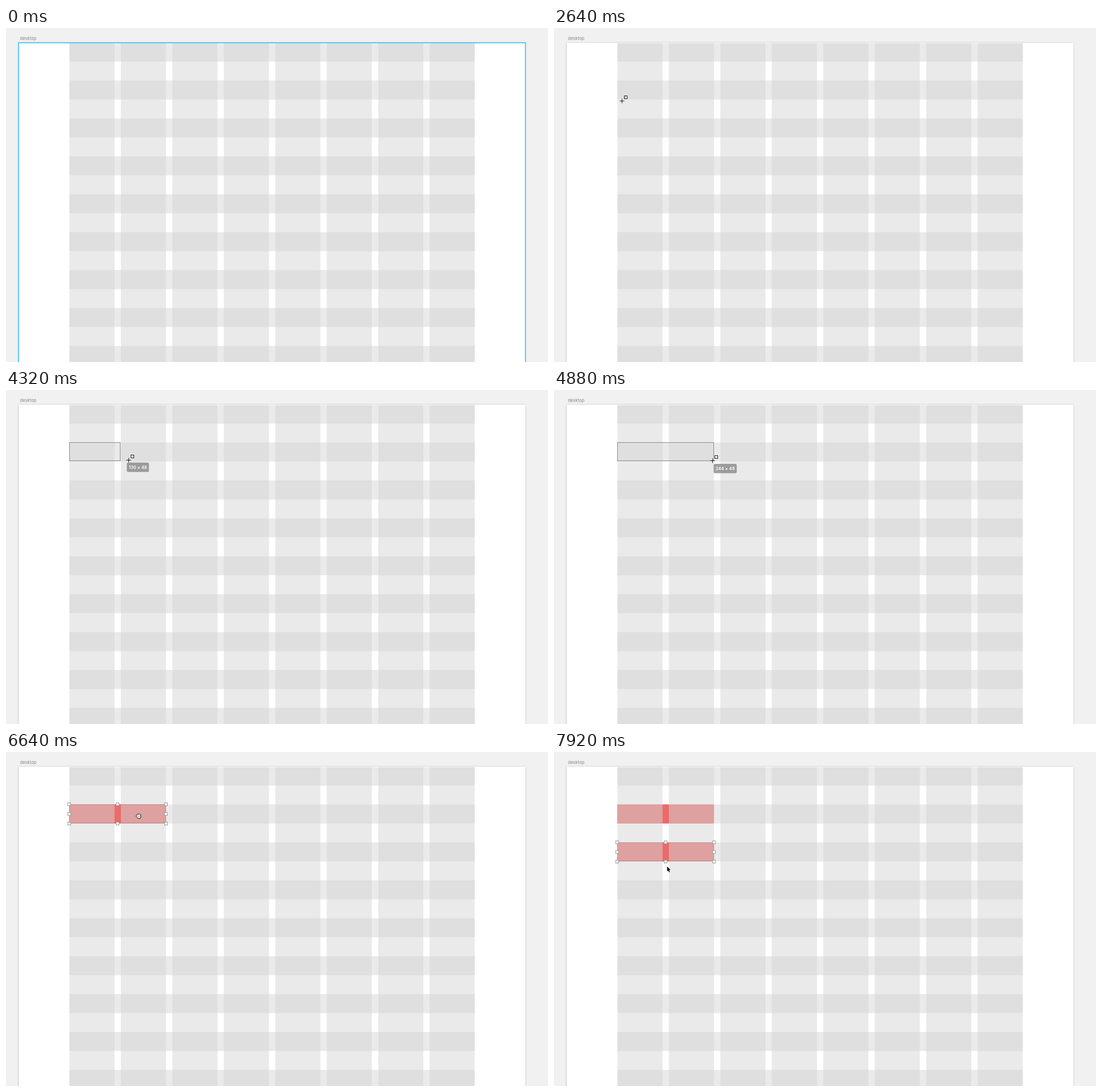
Write an HTML page with a canvas that moves like this. It is 952 px wide and 588 px high and loops after 8 s.

```html
<!DOCTYPE html>
<html lang="en">
<head>
<meta charset="utf-8">
<title>Grid layout</title>
<style>
html, body { margin: 0; width: 100%; height: 100%; overflow: hidden; background: #f1f1f1; }
canvas { display: block; }
</style>
</head>
<body>
<canvas id="stage" width="952" height="588"></canvas>
<script>
const ctx = document.getElementById('stage').getContext('2d');
const LOOP = 8000, STEP = 80;
const SCALE = 712 / 1024;
const ROW = 48 * SCALE, COL = 114 * SCALE, PITCH = 130 * SCALE;
const BOARD = { x: 22.3, y: 25.7, w: 890, h: 600 };
const LEFT = 111.4, WIDTH = 712;
const BLOCK = { x: LEFT, y: BOARD.y + 2 * ROW, w: PITCH + COL, h: ROW };
const FONT = 'Inter, Roboto, sans-serif';

// Moments at which the state changes
const ENTER = 640, SELECT = 1280, TOOL = 2000, DRAW = 3680, DROP = 5200;
const COPY = 6640, RELEASE = 7760;

// The pointer rests between moves; power 1 is linear, higher slows to a stop
const GRAB_Y = 113;
const MOVES = [
  { from: ENTER, to: 1120, x: 260, y: 261 },
  { from: SELECT, to: 1600, x: 225, y: 228 },
  { from: 1920, to: 2800, x: 115, y: 126 },
  { from: 2840, to: 3520, x: 112, y: 93 },
  { from: 3680, to: 3780, x: 130, y: 110, power: 1 },
  { from: 3780, to: 3840, x: 140, y: 114, power: 1 },
  { from: 3840, to: 4480, x: 233, y: 126, power: 1.2 },
  { from: 4520, to: 5040, x: 281, y: 125, power: 2.5 },
  { from: 5160, to: 5600, x: 296, y: 167 },
  { from: 5920, to: 6560, x: 233, y: GRAB_Y },
  { from: COPY, to: 7600, x: 233, y: 180 },
  { from: 7720, to: 7920, x: 199, y: 201 }
];

function pointerAt(t) {
  let x = 497, y = 574;
  for (const { from, to, x: tx, y: ty, power = 2 } of MOVES) {
    const p = Math.min(1, Math.max(0, (t - from) / (to - from)));
    const e = 1 - (1 - p) ** power;
    x += (tx - x) * e;
    y += (ty - y) * e;
  }
  return [x, y];
}

function snap(value, edges, reach) {
  const edge = edges.find(e => Math.abs(e - value) < reach);
  return edge === undefined ? value : edge;
}

function fill(color, x, y, w, h) {
  ctx.fillStyle = color;
  ctx.fillRect(x, y, w, h);
}

function stroke(color, x, y, w, h, width = 1) {
  ctx.strokeStyle = color;
  ctx.lineWidth = width;
  ctx.strokeRect(x, y, w, h);
}

function line(color, width, ...points) {
  ctx.strokeStyle = color;
  ctx.lineWidth = width;
  ctx.beginPath();
  points.forEach(([x, y]) => ctx.lineTo(x, y));
  ctx.stroke();
}

function text(str, x, y, size, weight, color, align = 'left') {
  ctx.font = `${weight} ${size}px ${FONT}`;
  ctx.fillStyle = color;
  ctx.textAlign = align;
  ctx.fillText(str, x, y);
}

function outline(color, x, y, w, h) {
  stroke(color, Math.round(x) + 0.5, Math.round(y) + 0.5, Math.round(w) - 1, Math.round(h) - 1);
}

function handle(x, y) {
  x = Math.round(x) - 2;
  y = Math.round(y) - 2;
  fill('#fff', x, y, 4, 4);
  stroke('#9a9a9a', x - 0.5, y - 0.5, 5, 5);
}

function handles({ x, y, w, h }) {
  for (const u of [0, 0.5, 1])
    for (const v of [0, 0.5, 1])
      if (u !== 0.5 || v !== 0.5) handle(x + u * w, y + v * h);
}

function board() {
  fill('#f1f1f1', 0, 0, 952, 588);
  text('desktop', 24.5, 21, 7.6, 400, '#858585');
  ctx.save();
  ctx.shadowColor = 'rgba(0,0,0,.4)';
  ctx.shadowBlur = 3;
  ctx.shadowOffsetY = 0.5;
  fill('#fff', BOARD.x, BOARD.y, BOARD.w, BOARD.h);
  ctx.restore();
}

// Both grids lie above the blocks and tint them
function grid() {
  const tint = 'rgba(214,214,214,.5)';
  for (let i = 0; i < 8; i++) fill(tint, LEFT + i * PITCH, BOARD.y, COL, BOARD.h);
  for (let i = 0; i < 18; i += 2) fill(tint, LEFT, BOARD.y + i * ROW, WIDTH, ROW);
}

function boardEdge(t) {
  const { x, y, w, h } = BOARD;
  if (t < SELECT) {
    stroke('#4dc3fa', 22, 26, 890.4, h, 1.7);
  } else if (t < TOOL) {
    stroke('#cfcfcf', x, y, w, h);
    [0, 0.5, 1].forEach(u => handle(x + u * w, y));
  } else {
    fill('#fafafa', x, 26, w, 0.8);
  }
}

// The box trails slightly behind the pointer and snaps to the grid
function sketchBox(t) {
  const [mx, my] = pointerAt(t - 60);
  const w = snap(mx, [LEFT + COL, LEFT + PITCH, LEFT + BLOCK.w], 6) - LEFT;
  const h = snap(my, [BLOCK.y + ROW], 4) - BLOCK.y;
  outline('#8d8d8d', LEFT, BLOCK.y, w, h);

  const label = `${Math.round(w / SCALE)} × ${Math.round(h / SCALE)}`;
  ctx.font = `600 7.6px ${FONT}`;
  const width = ctx.measureText(label).width + 7;
  ctx.fillStyle = 'rgba(125,125,125,.72)';
  ctx.beginPath();
  ctx.roundRect(mx + 5, my + 5, width, 16.5, 2.5);
  ctx.fill();
  text(label, mx + 8.5, my + 16.2, 7.6, 600, '#fff');
}

function guides(t, copy) {
  const red = '#e8464a';
  const top = BLOCK.y + ROW, gap = copy.y - top;
  line(red, 1, [111.5, BLOCK.y], [111.5, copy.y]);
  if (gap < 2 || t >= 7600) return;
  const x = 196.5;
  line(red, 1, [x, top], [x, copy.y]);
  for (const y of [top + 0.5, copy.y - 0.5]) line(red, 1, [x - 2, y], [x + 2, y]);
  text(Math.round(gap / SCALE), 194, top + gap / 2 + 2.7, 7.8, 400, '#e0342f', 'right');
}

function arrow(x, y) {
  ctx.save();
  ctx.translate(x - 0.3, y + 0.4);
  ctx.beginPath();
  ctx.moveTo(0, 0);
  ctx.lineTo(0, 8.8);
  ctx.lineTo(1.9, 7.1);
  ctx.lineTo(3.4, 10.3);
  ctx.lineTo(4.8, 9.7);
  ctx.lineTo(3.4, 6.5);
  ctx.lineTo(5.9, 6.3);
  ctx.closePath();
  ctx.strokeStyle = 'rgba(255,255,255,.8)';
  ctx.lineWidth = 1;
  ctx.stroke();
  ctx.fillStyle = '#000';
  ctx.fill();
  ctx.restore();
}

function cross(x, y) {
  x = Math.round(x) + 0.5;
  y = Math.round(y) - 0.5;
  line('#222', 1, [x - 4, y], [x + 4, y]);
  line('#222', 1, [x, y - 4], [x, y + 4]);
  fill('#f4f4f4', x + 4, y - 9, 5, 5);
  stroke('#222', x + 4, y - 9, 5, 5);
}

function fist(x, y) {
  ctx.beginPath();
  ctx.moveTo(x - 4.5, y);
  ctx.quadraticCurveTo(x - 3.5, y - 4, x - 1, y - 3.7);
  ctx.quadraticCurveTo(x + 2, y - 4.4, x + 3.6, y - 2.4);
  ctx.quadraticCurveTo(x + 5, y, x + 3, y + 3.8);
  ctx.lineTo(x - 1.5, y + 3.8);
  ctx.closePath();
  ctx.fillStyle = '#fff';
  ctx.fill();
  ctx.strokeStyle = '#111';
  ctx.lineWidth = 1;
  ctx.stroke();
  for (const dx of [-1.6, 0.4, 2.4]) line('#222', 0.7, [x + dx, y - 1.2], [x + dx, y + 0.8]);
}

function pointer(t) {
  if (t < ENTER) return;
  const drawing = t >= TOOL && t < DROP;
  const dragging = t >= COPY && t < RELEASE;
  const shape = drawing ? cross : dragging ? fist : arrow;
  shape(...pointerAt(t));
}

function render(t) {
  const copied = t >= COPY;
  const offset = snap(pointerAt(Math.min(t, 7600))[1] - GRAB_Y, [2 * ROW], 2);
  const copy = { ...BLOCK, y: BLOCK.y + offset };
  const active = copied ? copy : BLOCK;

  board();
  if (t >= DROP) fill('#f00', BLOCK.x, BLOCK.y, BLOCK.w, BLOCK.h);
  if (copied) fill('#f00', copy.x, copy.y, copy.w, copy.h);
  grid();
  boardEdge(t);
  if (t >= DRAW && t < DROP) sketchBox(t);
  if (copied && t < RELEASE) guides(t, copy);
  if (t >= DROP) {
    outline('rgba(130,120,120,.35)', active.x, active.y, active.w, active.h);
    handles(active);
  }
  pointer(t);
}

function frame() {
  const t = performance.now() % LOOP;
  render(Math.floor(t / STEP) * STEP);
  requestAnimationFrame(frame);
}
frame();
</script>
</body>
</html>
```
